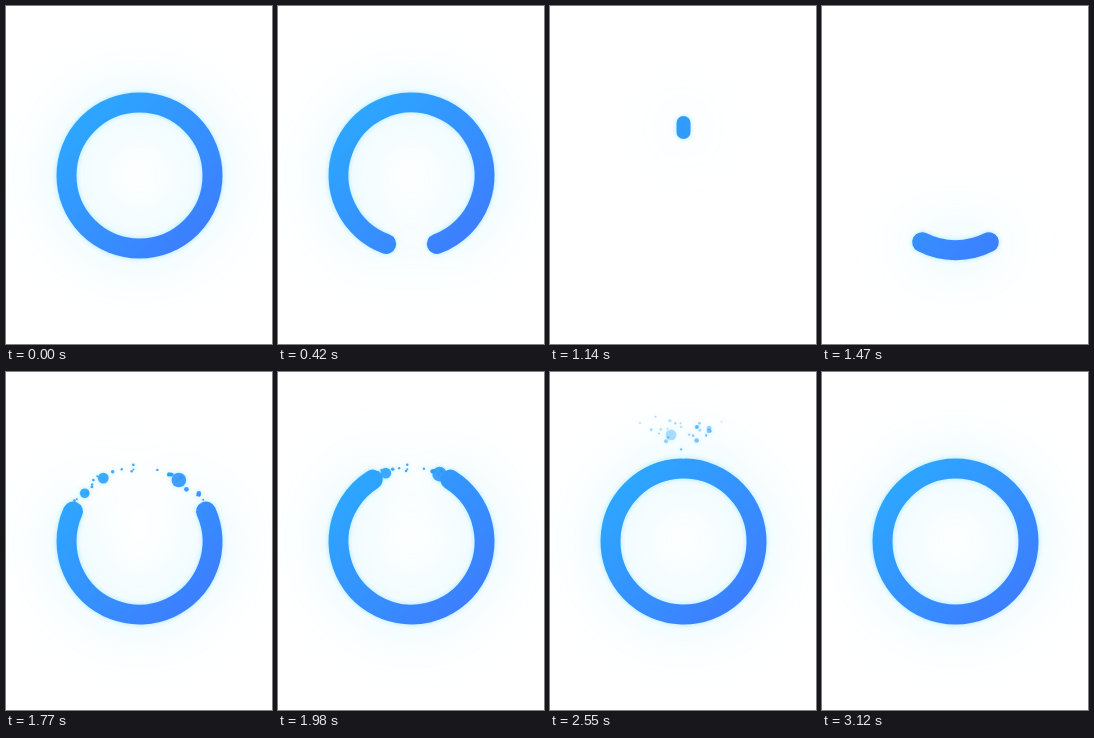
Animation, 266 px wide and 338 px high, one loop 3.15 s. Source, as an HTML page with a canvas:

```html
<!DOCTYPE html>
<html lang="en">
<head>
<meta charset="utf-8">
<title>Liquid ring</title>
<style>
  html, body { margin: 0; width: 100%; height: 100%; overflow: hidden; background: #fff; }
  canvas {
    display: block; width: 266px; height: 338px;
    filter: blur(.5px)
            drop-shadow(0 0 2.5px rgba(70, 205, 255, .45))
            drop-shadow(0 0 28px rgba(150, 230, 255, .42));
  }
</style>
</head>
<body>
<canvas id="stage"></canvas>
<script>
const LOOP = 3150, CX = 133.5, CY = 169.5, R = 73, W = 20;
const TOP = CY - R, BOTTOM = CY + R;
const FALL = 1000, LAND = 1340, SPREAD = 1405, SPREAD_TIME = 1644;
const SPRAY = 1590, SETTLE = 1770, RISE = 0.108;

const canvas = document.getElementById('stage');
const ctx = canvas.getContext('2d');
const dpr = window.devicePixelRatio || 1;
canvas.width = 266 * dpr;
canvas.height = 338 * dpr;

const paint = ctx.createLinearGradient(70, 106, 197, 233);
paint.addColorStop(0, '#2ca8ff');
paint.addColorStop(1, '#3d7dff');

const clamp = v => Math.min(1, Math.max(0, v));
const mix = (a, b, p) => a + (b - a) * p;
const hump = (t, from, to) => Math.sin(Math.PI * clamp((t - from) / (to - from)));

let seed = 11;
const rand = () => (seed = seed * 16807 % 2147483647) / 2147483647;

// a droplet runs along the circle to `angle`, then lifts off and fades
const droplet = (angle, r, lift, life, dist = R) => ({ angle, r, lift, life, dist });

const droplets = [
  droplet(-0.85, 4.8, Infinity, 0),
  droplet(-0.52, 5.4, 2230, 500),
  droplet(0.57, 7.3, Infinity, 0)
];
for (let i = 0; i < 28; i++) {
  const a = mix(0.08, 1.05, rand() ** 0.8);
  droplets.push(droplet(
    i % 2 ? a : -a,
    1 + 1.5 * rand() ** 2,
    mix(2130, 2400, rand()) - 150 * a,
    mix(500, 850, rand()),
    R + mix(-3, 5, rand())
  ));
}

// arc around a middle direction, reaching `half` radians to each side
function band(mid, half, dy) {
  const reach = Math.max(half, 0.001);
  ctx.beginPath();
  ctx.arc(CX, CY + dy, R, mid - reach, mid + reach);
  ctx.stroke();
}

function drop(t) {
  const u = t - FALL;
  const stretch = clamp(u / 140);
  const land = clamp((t - LAND) / (SPREAD - LAND));
  const w = mix(mix(W, 14, stretch), W, land);
  const h = mix(mix(W, 23, stretch), W, land);
  const y = Math.min(TOP + 0.00126 * u * u, BOTTOM);
  ctx.beginPath();
  ctx.roundRect(CX - w / 2, y - h / 2, w, h, w / 2);
  ctx.fill();
}

function spray(t) {
  const out = 1 - (1 - clamp((t - SPRAY) / (SETTLE - SPRAY))) ** 2;
  for (const d of droplets) {
    const age = Math.max(0, t - d.lift);
    if (t < SPRAY || age > d.life) continue;
    const pull = 1 - 0.7 * clamp((Math.min(t, d.lift) - SETTLE) / 480);
    const a = mix(Math.sign(d.angle) * 1.85, d.angle, out) * pull;
    ctx.globalAlpha = age ? 0.95 * (1 - age / d.life) : 0.9;
    ctx.beginPath();
    ctx.arc(CX + d.dist * Math.sin(a), CY - d.dist * Math.cos(a) - RISE * age, d.r, 0, 2 * Math.PI);
    ctx.fill();
  }
  ctx.globalAlpha = 1;
}

function draw(t) {
  ctx.setTransform(dpr, 0, 0, dpr, 0, 0);
  ctx.clearRect(0, 0, 266, 338);
  ctx.fillStyle = ctx.strokeStyle = paint;
  ctx.lineWidth = W;
  ctx.lineCap = 'round';

  if (t < FALL) {
    const p = clamp((t - 200) / 785) ** 1.2;
    band(-Math.PI / 2, Math.PI / 2 * (1 + Math.cos(Math.PI * p)), -2 * hump(t, 900, 1000));
  } else if (t < SPREAD) {
    drop(t);
  } else {
    const gap = Math.PI * (1 - clamp((t - SPREAD) / SPREAD_TIME)) ** 4;
    band(Math.PI / 2, Math.PI - gap, 2 * hump(t, SPREAD, SPREAD + 100));
    spray(t);
  }
}

const begin = performance.now();
function tick() {
  draw((performance.now() - begin) % LOOP);
  requestAnimationFrame(tick);
}
tick();
</script>
</body>
</html>
```
